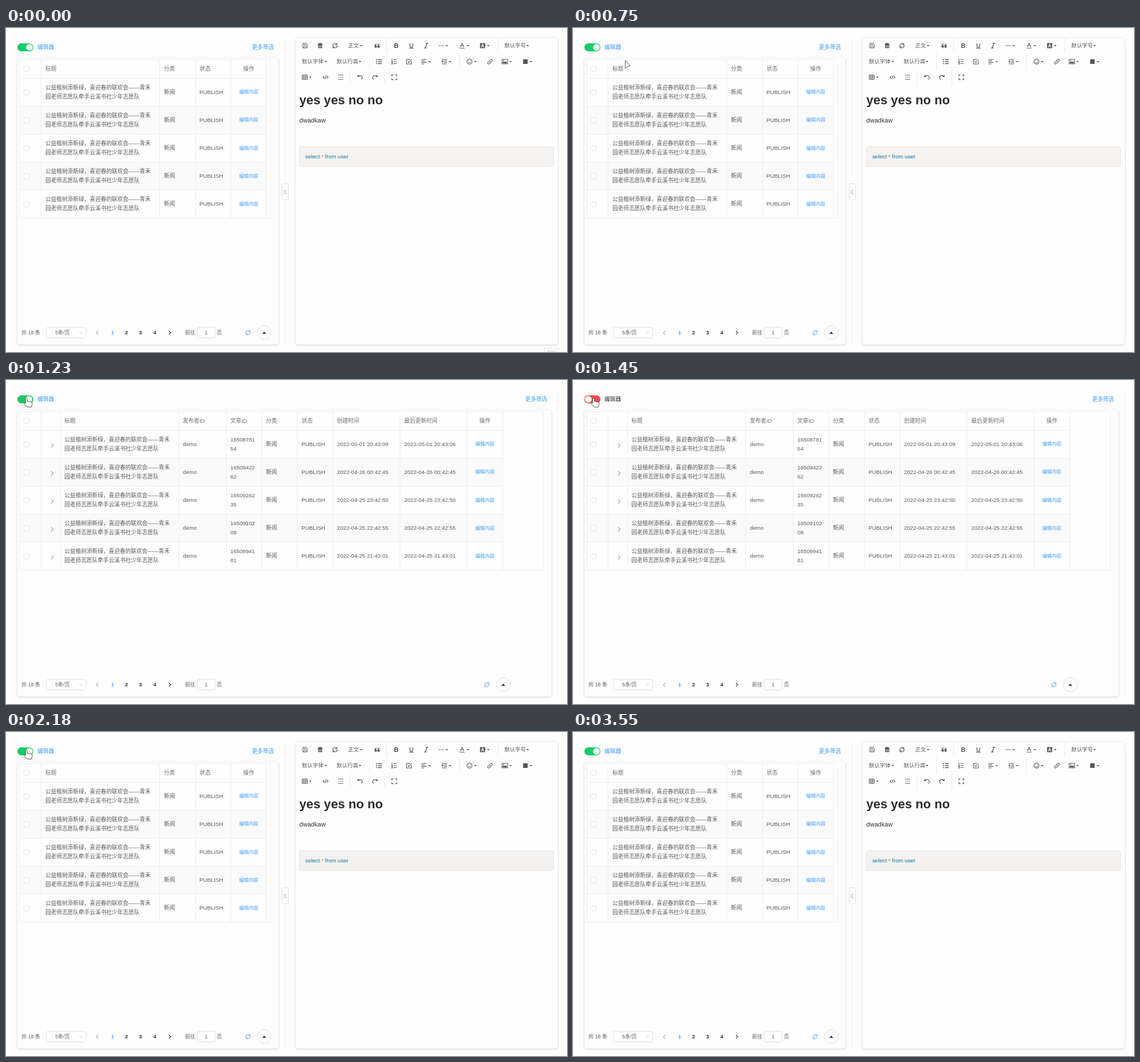
Animation of 984 by 569 pixels, one loop 3.72 s. Source, as an HTML page:

```html
<!DOCTYPE html>
<html lang="zh-CN">
<head>
<meta charset="utf-8">
<style>
html, body { margin: 0; width: 100%; height: 100%; overflow: hidden; background: #fefefe; }
svg { display: block; width: 984px; height: 569px; font: 9.72px "Liberation Sans", "Noto Sans CJK SC", "Noto Sans CJK", sans-serif; }
text { white-space: pre; }
.card { fill: #fefefe; stroke: #ebeef5; stroke-width: .7; filter: drop-shadow(0 1px 1.5px rgba(0,0,0,.16)); }
.icon { fill: none; stroke: #595959; stroke-width: 1.1; }
</style>
</head>
<body>
<svg id="stage" viewBox="0 0 984 569"></svg>
<script>
const LOOP = 3720, BLUE = '#409eff', INK = '#595b5f', RULE = '#ebeef5', EDGE = '#dcdfe6', DARK = '#595959';
const ROW0 = 88.3, ROW_H = 49.15, BOTTOM = 334;

// Text is placed by its vertical centre.
const text = (x, y, s, { fill = INK, size = 9.72, anchor = 'start', weight = 400, extra = '' } = {}) =>
  `<text x="${x}" y="${y + size * .35}" fill="${fill}" font-size="${size}" text-anchor="${anchor}" font-weight="${weight}" ${extra}>${s}</text>`;
const rect = (x, y, w, h, fill, stroke = 'none', r = 0, extra = '') =>
  `<rect x="${x}" y="${y}" width="${w}" height="${h}" rx="${r}" fill="${fill}" stroke="${stroke}" ${extra}/>`;
const card = (x, y, w, h) => `<rect class="card" x="${x}" y="${y}" width="${w}" height="${h}" rx="5"/>`;
const lines = (d, color = RULE) => `<path d="${d}" fill="none" stroke="${color}"/>`;
const icon = (x, y, d, extra = '') => `<path class="icon" transform="translate(${x} ${y})" d="${d}" style="${extra}"/>`;
const solid = `fill:${DARK};stroke:none`;
const caret = (x, y) => icon(x, y, 'M-2.3-1H2.3L0 1.6z', solid);
const middle = { anchor: 'middle' };
const reload = 'M-3.8 1A4 4 0 0 1 3-2.6M3.4-4.6V-2H.8M3.8-1A4 4 0 0 1-3 2.6M-3.4 4.6V2H-.8';

const headline = ['公益植树添新绿，喜迎春的联欢会——青禾', '园老师志愿队牵手云溪书社少年志愿队'];
const articles = [
  ['16508781', '54', '2022-05-01 20:43:09', '2022-05-01 20:43:06'],
  ['16509422', '62', '2022-04-26 00:42:45'],
  ['16509262', '35', '2022-04-25 23:42:50'],
  ['16509102', '08', '2022-04-25 22:42:55'],
  ['16508941', '81', '2022-04-25 21:43:01'],
];

const pair = (x, y, a, b) => text(x, y - 8, a) + text(x, y + 8, b);
const link = (x, y) => text(x, y, '编辑内容', { fill: BLUE, size: 8.4, ...middle });
const checkbox = y => rect(31.5, y - 4.5, 9, 9, '#fff', EDGE, 1.5, 'stroke-width=".8"');

function table(edges, heads, cells) {
  const end = edges[edges.length - 1], inner = edges[edges.length - 2];
  let s = '';
  for (const i of [1, 3]) s += rect(24, ROW0 + i * ROW_H, inner - 24, ROW_H, '#fafafa');
  let grid = `M24 55.5H${end}M24 ${BOTTOM}H${end}`;
  for (let i = 0; i < 5; i++) grid += `M24 ${Math.floor(ROW0 + i * ROW_H) + .5}H${inner}`;
  for (const x of edges) grid += `M${x} 55.5V${BOTTOM}`;
  s += lines(grid) + checkbox(71.5);
  for (const [x, label, opts] of heads) s += text(x, 71.5, label, { fill: '#6c6f74', weight: 500, ...opts });
  articles.forEach((a, i) => {
    const y = 112.3 + i * ROW_H;
    s += checkbox(y + .7) + cells(a, y);
  });
  return s;
}

function pager(refreshX, topX) {
  let s = text(27, 535, '共 18 条', { size: 9 })
    + rect(71, 525.5, 69, 19, '#fff', EDGE, 2.5) + text(99, 535, '5条/页', { size: 9, ...middle })
    + icon(131, 535, 'M-2.5-1.2L0 1.3 2.5-1.2', 'stroke:#c0c4cc;stroke-width:.9')
    + icon(160, 535, 'M1.5-3L-1.5 0 1.5 3', 'stroke:#a8abb2')
    + icon(287.5, 535, 'M-1.5-3L1.5 0-1.5 3', 'stroke:#303133');
  [187, 211.5, 236, 261].forEach((x, i) =>
    s += text(x, 535, i + 1, { fill: i ? '#303133' : BLUE, size: 9, weight: 700, ...middle }));
  return s + text(314, 535, '前往', { size: 9 }) + rect(335.5, 525.5, 31.5, 19, '#fff', EDGE, 2.5)
    + text(351, 535, '1', { size: 9, ...middle }) + text(370, 535, '页', { size: 9 })
    + icon(refreshX, 535, reload, `stroke:${BLUE};stroke-width:.9`)
    + `<circle cx="${topX}" cy="535" r="12.2" fill="#fff" stroke="${EDGE}"/>`
    + icon(topX, 535, 'M-3.6 2.2L0-2 3.6 2.2z', 'fill:#444;stroke:none');
}

const filterLink = x => text(x, 34, '更多筛选', { fill: BLUE, anchor: 'end' });

function toolbar() {
  const label = (x, y, s) => text(x, y, s, { fill: DARK, size: 9.5 });
  const glyph = (x, y, s, extra = '') => text(x, y, s, { fill: '#4a4a4a', size: 11, weight: 700, anchor: 'middle', extra });
  const carets = { 31: [623, 773, 810, 846, 915], 59: [561, 621, 743, 779, 823, 885, 921], 86.5: [534] };
  let s = lines('M667.5 17V44M862.5 17V44M637.5 45V72M795.5 45V72M603.5 73V100M664.5 73V100', '#ececec');
  for (const y in carets) for (const x of carets[y]) s += caret(x, +y);
  return s
    + icon(524.5, 31, 'M-4-4H2L4-2V4H-4zM-2-4V-1.5H1.5V-4M-2 4V1H2V4', 'stroke-width:.9')
    + icon(551, 31, 'M-4-3H4M-1.5-4H1.5M-3-1.5H3V3.6H-3zM-1-1V3M1-1V3', 'stroke-width:1.3')
    + icon(577, 31, reload)
    + label(600, 31, '正文')
    + icon(651, 31, 'M-4.5 3.5V0Q-4.5-3-1-3.5V-2Q-2.3-1.5-2.4 0H-.6V3.5zM.6 3.5V0Q.6-3 4.1-3.5V-2Q2.8-1.5 2.7 0H4.5V3.5z', solid)
    + glyph(684.5, 31, 'B')
    + icon(711, 31, 'M-2.6-4V0A2.6 2.6 0 0 0 2.6 0V-4M-4 4.3H4', 'stroke-width:1.3')
    + icon(737, 31, 'M-.5-4H3.5M-3.5 4H.5M1.5-4L-1.5 4', 'stroke-width:1.3')
    + icon(763, 31, 'M-4 0h1.6M-.8 0h1.6M2.4 0h1.6', 'stroke-width:1.6')
    + icon(800, 31, 'M-3 2L0-4 3 2M-1.8 0H1.8M-4.5 4.3H4.5')
    + rect(831.5, 26.5, 9, 9, DARK, 'none', 1) + icon(836, 31, 'M-2.3 3L0-2.7 2.3 3M-1.5 1H1.5', 'stroke:#fff')
    + label(874, 31, '默认字号')
    + label(519, 59, '默认字体') + label(580, 59, '默认行高')
    + icon(654, 59, 'M-5-3.5h2M-5 0h2M-5 3.5h2M-1.5-3.5H5M-1.5 0H5M-1.5 3.5H5', 'stroke-width:1.4')
    + icon(681, 59, 'M-4-5V-2M-5-1H-3.5V1H-5M-5 2H-3.5V4.5H-5M-1.5-3.5H4.5M-1.5 0H4.5M-1.5 3.5H4.5')
    + icon(707, 59, 'M4-.5V4.3H-4.5V-4H2M-2.5-.5L-.5 1.8 4.5-4')
    + icon(733, 59, 'M-4.5-3.8H4.5M-4.5-1.2H2M-4.5 1.4H4.5M-4.5 4H1')
    + icon(769, 59, 'M-4.5-3.8H4.5M-.5-1.2H4.5M-.5 1.4H4.5M-4.5 4H4.5M-4-1.5L-2 .1-4 1.7z')
    + icon(813, 59, 'M-4.5 0A4.5 4.5 0 1 1 4.5 0A4.5 4.5 0 1 1-4.5 0M-2.2 1Q0 3.6 2.2 1M-1.8-2V-.7M1.8-2V-.7')
    + icon(849, 59, 'M-1 1.3Q-2.4-.2-1-1.6L1-3.6Q2.6-4.7 3.8-3.5T3.7-.8L2.7.2M1-1.3Q2.4.2 1 1.6L-1 3.6Q-2.6 4.7-3.8 3.5T-3.7.8L-2.7-.2')
    + icon(875, 59, 'M-4.8-4H4.8V4H-4.8z') + icon(875, 59, 'M-3.8 3V1.5L-1.8-1 0 1 2-.8 3.8 1.5V3zM-3-2.8h1.7v1.6h-1.7z', solid)
    + rect(907, 55, 8, 8, DARK)
    + icon(524, 86.5, 'M-4.5-4H4.5V4H-4.5zM-4.5-1.5H4.5M-4.5 1.3H4.5M-1.5-4V4M1.5-4V4', 'stroke-width:.9')
    + icon(560.5, 86.5, 'M-2-2.3L-4.4 0-2 2.3M2-2.3L4.4 0 2 2.3M.8-3L-.8 3')
    + icon(587, 86.5, 'M-4.5-3.8H4.5M-4.5 0H-2.5M-1 0H1M2.5 0H4.5M-4.5 3.8H4.5')
    + icon(621, 86.5, 'M-4.2-4V-1H-1.2M-4-1.2Q0-5 3.2-1.6 5.2 1.4 2.4 4', 'stroke-width:1.2')
    + icon(647, 86.5, 'M4.2-4V-1H1.2M4-1.2Q0-5-3.2-1.6-5.2 1.4-2.4 4', 'stroke-width:1.2')
    + icon(681, 86.5, 'M-4.2-1.5V-4.2H-1.5M1.5-4.2H4.2V-1.5M4.2 1.5V4.2H1.5M-1.5 4.2H-4.2V1.5', 'stroke-width:1.2');
}

const splitView = lines('M489.5 17V556', '#f0f1f4')
  + card(20, 52, 458, 504) + filterLink(470)
  + table([24, 61.5, 269.5, 332.5, 394.5, 457, 464],
    [[69, '标题'], [277, '分类'], [339.5, '状态'], [425.7, '操作', middle]],
    (a, y) => pair(69, y, ...headline) + text(277, y, '新闻') + text(339.3, y, 'PUBLISH') + link(425.7, y))
  + pager(424.5, 453)
  + rect(484.5, 273.5, 11, 28, '#fefefe', EDGE, 2) + icon(489.5, 288, 'M1.7-4L-1.7 0 1.7 4', 'stroke:#888;stroke-width:1')
  + card(507.5, 17, 460.5, 539) + toolbar()
  + text(514.5, 126.4, 'yes yes no no', { fill: '#2c2c2e', size: 22.15, weight: 700 })
  + text(514.5, 162, 'dwadkaw', { fill: '#303133', size: 11.1 })
  + rect(514.5, 208.5, 446, 35, '#f5f2f0', '#e8e6e4', 2.5, 'id="code"')
  + text(525, 225.6, 'select <tspan fill="#9a6e3a">*</tspan> from user', { fill: '#0077aa' });

const wideView = lines('M967.5 17V557', '#f0f1f4')
  + card(20, 52, 937, 504) + filterLink(949.3)
  + table([24, 61.5, 95.5, 303, 386.5, 448.5, 511, 573.5, 691, 808.5, 871.5, 942.5],
    [[102.5, '标题'], [310, '发布者ID'], [393.5, '文章ID'], [456, '分类'], [518.5, '状态'],
     [580.5, '创建时间'], [698.5, '最后更新时间'], [840, '操作', middle]],
    ([id, tail, made, changed = made], y) => icon(81, y + 2.5, 'M-2-4L2 0-2 4', 'stroke:#73767a;stroke-width:1')
      + pair(102.5, y, ...headline) + text(310.3, y, 'demo') + pair(393.5, y, id, tail)
      + text(456, y, '新闻') + text(518.3, y, 'PUBLISH') + text(580.5, y, made) + text(698.5, y, changed) + link(840, y))
  + pager(843.5, 872.3);

const $ = id => document.getElementById(id);
$('stage').innerHTML = `
  <g id="split">${splitView}</g><g id="wide">${wideView}</g>
  ${rect(20, 27, 28, 14, '#13ce66', 'none', 7)}${rect(20, 27, 28, 14, '#ff4949', 'none', 7, 'id="red"')}
  <circle id="knob" cy="34" r="5.8" fill="#fff"/>
  ${text(55, 34, '编辑器', { weight: 500, extra: 'id="label"' })}
  <g id="tip">${rect(944.5, 562.5, 24, 14, '#fff', '#e6e6e6')}${text(956.5, 570.5, '截图', { size: 8, fill: '#ccc', ...middle })}</g>
  <g id="cursor" fill="#fff" stroke="#555" stroke-linejoin="round">
    <path id="arrow" d="M0 0V14.5L3.5 11.4 8.4 9.2z"/>
    <path id="hand" d="M-1.6 8V1.5Q0-1.2 1.6 1.5V5.8L8.5 7.2Q10.5 7.8 10 10.2L8.6 15.8H1.2L-4 9.8Q-3.6 7.4-1.6 9z"/>
  </g>`;

// Pointer path: [time, x, y]
const path = [[20, 948, 556], [300, 750, 400], [530, 432, 153], [640, 240, 88], [750, 92, 57],
  [900, 48, 36], [1060, 36, 31.8], [3110, 36, 31.8], [3200, 130, 90], [3330, 470, 290], [3550, 974, 569]];

function pointerAt(t) {
  const i = Math.max(1, path.findIndex(p => p[0] >= t));
  const [t0, x0, y0] = path[i - 1], [t1, x1, y1] = path[i];
  const k = (t - t0) / (t1 - t0);
  return [x0 + (x1 - x0) * k, y0 + (y1 - y0) * k];
}

const ease = (t, from, to) => {
  const k = Math.min(1, Math.max(0, (t - from) / (to - from)));
  return k * k * (3 - 2 * k);
};
const show = (id, on) => $(id).style.display = on ? '' : 'none';

function draw() {
  const t = performance.now() % LOOP;
  const wide = t >= 1210 && t < 1770;
  show('wide', wide);
  show('split', !wide);
  $('code').setAttribute('fill', t < 1770 ? '#f5f2f0' : '#f3f2f0');

  const off = ease(t, 1195, 1450) - ease(t, 1900, 2180);
  $('red').setAttribute('opacity', off);
  $('knob').setAttribute('cx', 41 - 14 * off);
  $('label').setAttribute('fill', off > .5 ? '#303133' : BLUE);

  show('tip', t < 20);
  const moving = t >= 20 && t < 3550;
  show('cursor', moving);
  if (moving) {
    const [x, y] = pointerAt(t), onSwitch = x < 48 && y < 41;
    $('cursor').setAttribute('transform', `translate(${x} ${y})`);
    show('hand', onSwitch);
    show('arrow', !onSwitch);
  }
  requestAnimationFrame(draw);
}
draw();
</script>
</body>
</html>
```
